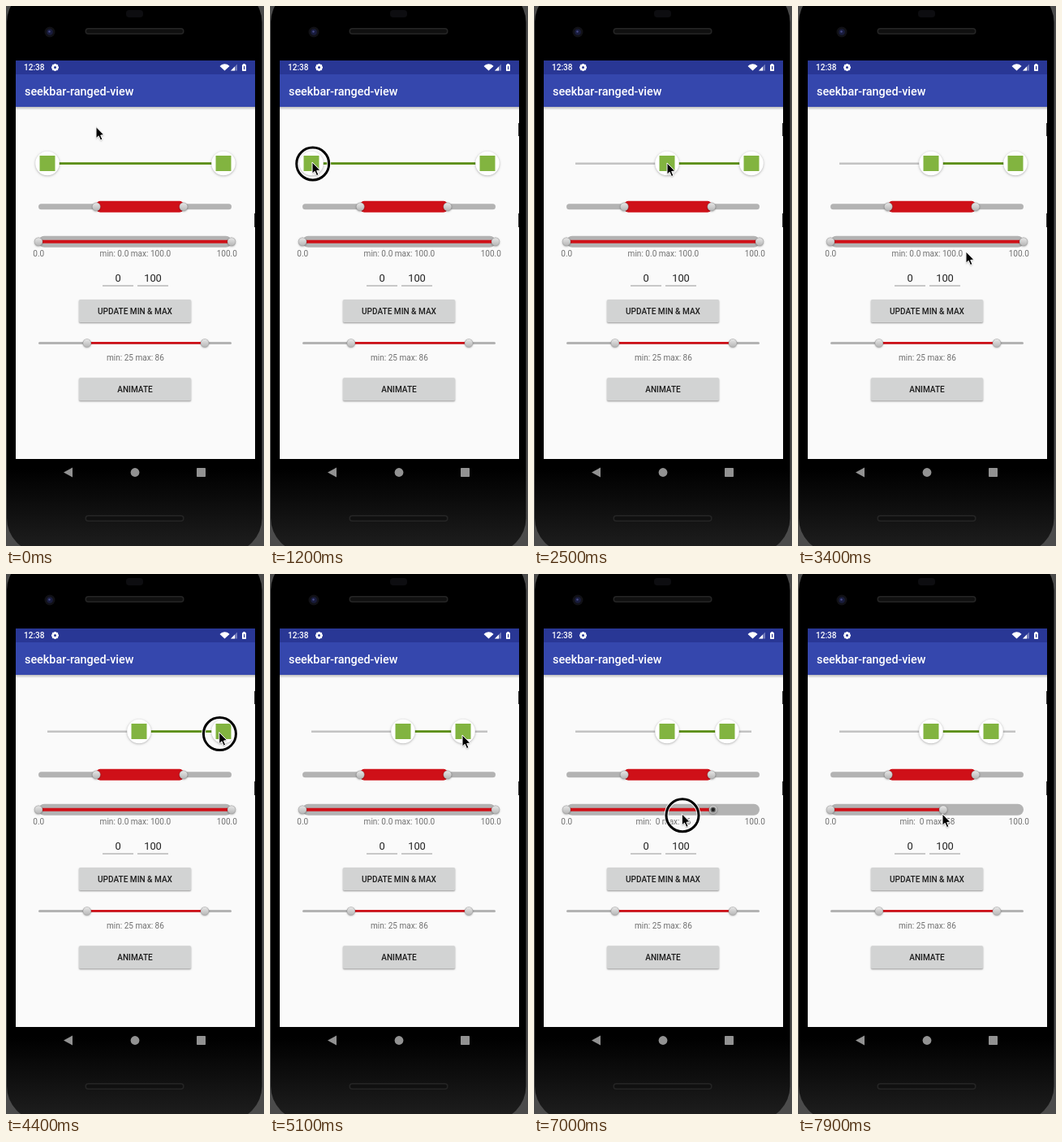
These frames come from a looping animation (318x664 px, 8 s). An HTML page with a canvas:

```html
<!DOCTYPE html>
<html lang="en">
<head>
<meta charset="utf-8">
<title>Ranged seek bars</title>
<style>
html, body { margin: 0; width: 100%; height: 100%; overflow: hidden; background: #000; }
canvas { display: block; width: 318px; height: 664px; }
</style>
</head>
<body>
<canvas id="stage"></canvas>
<script>
const W = 318, H = 664, LOOP = 8000, STEP = 100;
const canvas = document.getElementById('stage');
const ratio = window.devicePixelRatio || 1;
canvas.width = W * ratio;
canvas.height = H * ratio;
const c = canvas.getContext('2d');

const RED = '#cf1018', GRAY = '#b3b3b3', GREEN = '#5a8e0c', INK = '#707070';
const LEFT = 40, RIGHT = 278;

// The pointer glides from where it is to (x, y) between two times.
const MOVES = [
  { from: 0, to: 200, x: 107, y: 189 },
  { from: 300, to: 1100, x: 52, y: 192 },
  { from: 1200, to: 2200, x: 164, y: 193 },
  { from: 2500, to: 3000, x: 207, y: 282 },
  { from: 3000, to: 3100, x: 207, y: 327 },
  { from: 3300, to: 3400, x: 207, y: 302 },
  { from: 3400, to: 4200, x: 267, y: 194 },
  { from: 4300, to: 5000, x: 237, y: 198 },
  { from: 5100, to: 5700, x: 277, y: 290 },
  { from: 5900, to: 7050, x: 178, y: 295 }
];

const progress = (t, from, to) => Math.min(1, Math.max(0, (t - from) / (to - from)));
const mix = (a, b, p) => a + (b - a) * p;
const within = (t, from, to) => t >= from && t < to;
const easeOut = p => 1 - (1 - p) ** 1.5;

function pointerAt(t) {
  let x = 111, y = 148.5;
  for (const m of MOVES) {
    const p = progress(t, m.from, m.to);
    x = mix(x, m.x, p);
    y = mix(y, m.y, p);
  }
  return [x, y];
}

// The handles trail behind the pointer that drags them.
function stateAt(t) {
  return {
    low: mix(51, 164, progress(t, 1500, 2500)),
    high: mix(268, 238, progress(t, 4400, 5100)),
    top: mix(RIGHT, 179, easeOut(progress(t, 6300, 7900))),
    pointer: pointerAt(t),
    pressed: within(t, 1100, 2500) || within(t, 4300, 5100) || within(t, 5900, 7500),
    held: within(t, 5900, 7500),
    edited: t >= 6000,
    edge: t >= 100
  };
}

function box(x, y, w, h, color, r = 0) {
  c.fillStyle = color;
  c.beginPath();
  c.roundRect(x, y, w, h, r);
  c.fill();
}

function disc(x, y, r, color) {
  c.fillStyle = color;
  c.beginPath();
  c.arc(x, y, r, 0, 7);
  c.fill();
}

function poly(points, color) {
  c.fillStyle = color;
  c.beginPath();
  points.forEach(([x, y]) => c.lineTo(x, y));
  c.closePath();
  c.fill();
}

function fade(y1, y2, color1, color2) {
  const g = c.createLinearGradient(0, y1, 0, y2);
  g.addColorStop(0, color1);
  g.addColorStop(1, color2);
  return g;
}

function text(str, x, y, size, color, weight = 400, align = 'center') {
  c.font = `${weight} ${size}px Roboto, sans-serif`;
  c.textAlign = align;
  c.fillStyle = color;
  c.fillText(str, x, y);
}

const label = (str, x, y) => text(str, x, y, 10.05, INK);

function shaded(alpha, blur, dy, paint) {
  c.save();
  c.shadowColor = `rgba(0,0,0,${alpha})`;
  c.shadowBlur = blur * ratio;
  c.shadowOffsetY = dy * ratio;
  paint();
  c.restore();
}

function bar(x1, x2, y, h, color, r = h / 2) {
  box(x1, y - h / 2, x2 - x1, h, color, r);
}

function knob(x, y, held) {
  shaded(0.35, 2, 0.7, () => disc(x, y, 5.2, '#a8a8a8'));
  disc(x, y, 4.6, fade(y - 5, y + 5, '#e8e8e8', '#b6b6b6'));
  if (held) {
    disc(x, y, 3.6, '#777');
    disc(x, y, 2.2, '#222');
  }
}

function badge(x) {
  shaded(0.3, 3, 0.8, () => disc(x, 193.5, 14.8, '#fff'));
  box(x - 9.5, 184, 19, 19, '#82b440');
}

function button(str, y) {
  shaded(0.4, 2, 1, () => box(90, y, 138, 28, '#d2d3d3', 1.5));
  text(str, 159, y + 18, 10.05, '#1c1c1c', 500);
}

function field(value, x) {
  text(value, x, 339, 12.9, '#202020');
  box(x - 19, 343.5, 38, 1, '#989898');
}

function slot(y) {
  box(97.5, y, 122, 8, '#252525', 4);
  box(99, y + 1.5, 119, 5, '#101010', 2.5);
}

function gear(x, y) {
  c.save();
  c.translate(x, y);
  for (let i = 0; i < 4; i++) {
    box(-1.2, -4.5, 2.4, 9, '#fff', 0.5);
    c.rotate(Math.PI / 4);
  }
  c.restore();
  disc(x, y, 3.4, '#fff');
  disc(x, y, 1.5, '#293795');
}

function phone(edge) {
  box(0, 0, W, H, '#4b4b4b');
  box(1, -22, 314.5, 694, fade(570, H, '#000', '#1d1d1d'), 42);

  box(148, 5, 21, 9, '#0d0d10', 4);
  slot(27);
  slot(626);
  disc(54, 32, 6.5, '#111116');
  disc(54, 32, 3.8, '#191c3c');
  disc(53.5, 31.5, 1.2, '#484d8c');

  box(12, 67, 295, 490, '#fafafa');
  box(306, 255, 1, 17, '#333');
  if (edge) box(306, 144, 1, 16, '#333');
}

function wedge(size, color) {
  poly([[277, 79.5], [277 + size, 79.5], [277 + size, 79.5 - size]], color);
}

function header() {
  box(12, 124, 295, 4, fade(124, 128, 'rgba(0,0,0,.25)', 'rgba(0,0,0,0)'));
  box(12, 67, 295, 17, '#293795');
  box(12, 84, 295, 40, '#3547ad');
  text('12:38', 22, 79, 10.05, '#fff', 500, 'left');
  gear(60.5, 75.5);

  c.fillStyle = '#fff';
  c.beginPath();
  c.moveTo(269.5, 79.5);
  c.arc(269.5, 79.5, 8.2, -Math.PI * 0.76, -Math.PI * 0.24);
  c.fill();
  wedge(8, 'rgba(255,255,255,.35)');
  wedge(5, '#fff');
  box(291, 72, 5, 8, '#fff', 0.7);
  box(292.3, 71, 2.4, 1.5, '#fff');
  box(293, 74, 1.2, 4, '#293795');

  text('seekbar-ranged-view', 23, 109.5, 14.36, '#fff', 500, 'left');
}

function navigation() {
  poly([[71, 573.5], [82, 567.5], [82, 579.5]], '#929292');
  disc(159, 573.5, 5.4, '#929292');
  box(235, 568, 11, 11, '#929292', 0.7);
}

function slider(y, from, to, trackSize, fillSize, round, held) {
  bar(LEFT, RIGHT, y, trackSize, GRAY);
  bar(from, to, y, fillSize, RED, round);
  knob(from, y);
  knob(to, y, held);
}

function sliders({ low, high, top, held, edited }) {
  bar(51, 268, 193.7, 2.6, '#c3c3c3', 0);
  bar(low, high, 193.7, 2.7, GREEN, 0);
  badge(low);
  badge(high);

  slider(246.8, 111.3, 218.8, 7, 14, 5);
  slider(289.8, LEFT, top, 14, 4, 0, held);
  slider(414.4, 99.8, 245, 3, 2.8, 0);

  const value = Math.round(100 * (top - LEFT) / (RIGHT - LEFT));
  label('0.0', 40.3, 307.7);
  label(edited ? `min:  0 max: ${value}` : 'min: 0.0 max: 100.0', 159.4, 307.7);
  label('100.0', 272.3, 307.7);
  label('min: 25 max: 86', 159.4, 436);
}

function ring(x, y) {
  c.beginPath();
  c.arc(x, y, 20, 0, 7);
  c.strokeStyle = 'rgba(255,255,255,.85)';
  c.lineWidth = 5;
  c.stroke();
  c.strokeStyle = '#000';
  c.lineWidth = 3;
  c.stroke();
}

function arrow(x, y) {
  const shape = [[0, 0], [0, 14.2], [3.2, 11.3], [5.5, 16.6], [7.9, 15.5], [5.7, 10.5], [9.8, 10]];
  c.save();
  c.translate(x, y);
  shaded(0.35, 2, 1, () => poly(shape, '#000'));
  c.lineWidth = 1;
  c.lineJoin = 'round';
  c.strokeStyle = '#fff';
  c.stroke();
  c.restore();
}

function draw(t) {
  const state = stateAt(t);
  c.setTransform(ratio, 0, 0, ratio, 0, 0);
  phone(state.edge);
  header();
  sliders(state);
  field('0', 138);
  field('100', 181);
  button('UPDATE MIN & MAX', 361);
  button('ANIMATE', 457.3);
  navigation();

  const [x, y] = state.pointer;
  if (state.pressed) ring(x + 0.7, y + 2);
  arrow(x, y);
}

const start = performance.now();
function tick() {
  const t = (performance.now() - start) % LOOP;
  draw(Math.floor(t / STEP) * STEP);
  requestAnimationFrame(tick);
}
tick();
</script>
</body>
</html>
```
